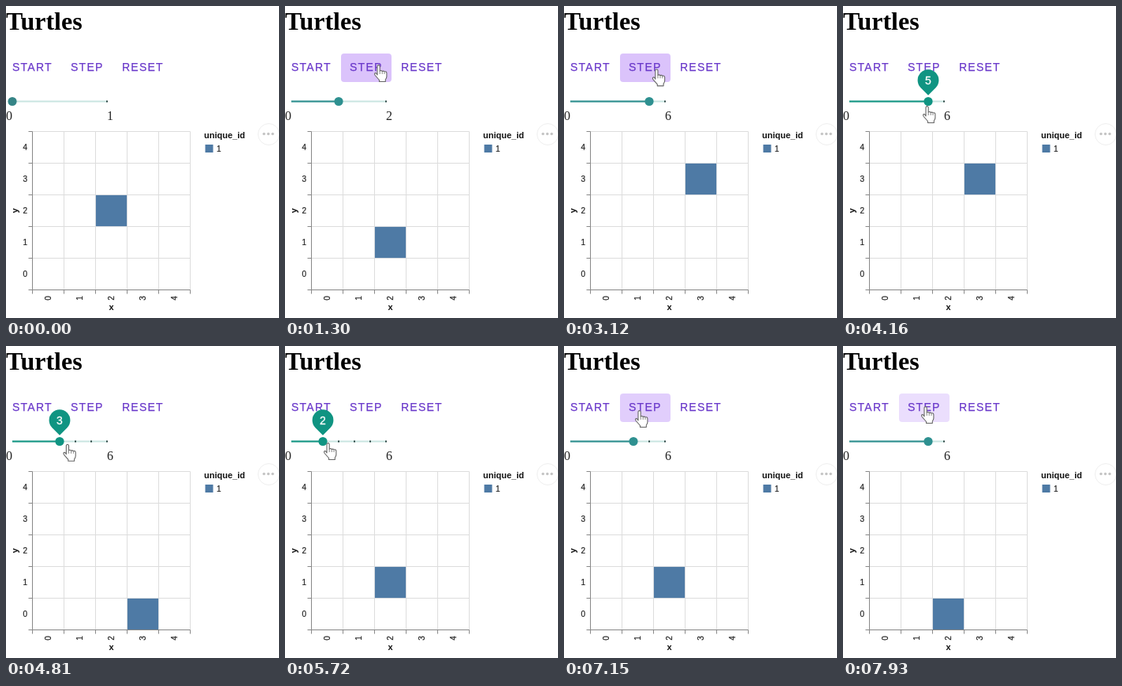
Write an HTML page that moves like this. It is 346x394 px and loops after 8 s.

```html
<!DOCTYPE html>
<html lang="en">
<head>
<meta charset="utf-8">
<title>Turtles</title>
<style>
  html, body { margin: 0; width: 100%; height: 100%; overflow: hidden; background: #fff; }
  svg { display: block; width: 346px; height: 394px; }
  text { font-family: "Liberation Sans", Arial, sans-serif; }
  .serif { font-family: "Liberation Serif", "Times New Roman", serif; font-size: 16px; fill: #222; }
  .button { font-size: 14px; letter-spacing: 1.25px; fill: #6a38ca; stroke: #6a38ca; stroke-width: .25px; }
  .label { font-size: 10px; fill: #222; stroke: #222; stroke-width: .2px; }
  .title { font-size: 11px; font-weight: bold; fill: #111; }
</style>
</head>
<body>
<svg viewBox="0 0 346 394">
  <defs><clipPath id="buttonClip"><rect x="71" y="60" width="64" height="36" rx="4"/></clipPath></defs>

  <text class="serif" y="30.4" style="font-size:32px;font-weight:bold;fill:#000">Turtles</text>

  <g clip-path="url(#buttonClip)" fill="#6200ee">
    <rect id="hover" x="71" y="60" width="64" height="36" opacity="0"/>
    <circle id="ripple" opacity="0"/>
  </g>
  <text class="button" x="8" y="82">START</text>
  <text class="button" x="82" y="82">STEP</text>
  <text class="button" x="147" y="82">RESET</text>

  <rect x="8" y="119.5" width="120" height="2" fill="#c9e5e1"/>
  <g id="marks" fill="#26413f"></g>
  <rect id="fill" x="8" y="119.5" height="2"/>
  <circle id="thumb" cy="120.5" r="5.6"/>
  <text class="serif" x="0" y="144">0</text>
  <text class="serif" id="max" x="128" y="144"></text>

  <g id="grid" fill="none"></g>
  <rect id="turtle" width="40" height="40" fill="#4e7aa5" stroke="#d3d8de"/>
  <g id="axes" fill="none" stroke="#888"></g>
  <g id="labels"></g>
  <text class="title" x="133.5" y="384" text-anchor="middle">x</text>
  <text class="title" transform="translate(15 258.5) rotate(-90)" text-anchor="middle">y</text>

  <text class="title" x="251" y="167">unique_id</text>
  <rect x="252.5" y="175" width="10" height="10" fill="#4e7aa5"/>
  <text class="label" x="267" y="183.5">1</text>

  <circle cx="333" cy="162" r="13.5" fill="#fff" stroke="#efefef"/>
  <g fill="#c4c4c4">
    <circle cx="327" cy="161.5" r="1.7"/><circle cx="332.5" cy="161.5" r="1.7"/><circle cx="338" cy="161.5" r="1.7"/>
  </g>

  <g id="bubble">
    <path d="M0 18.5L-9.5 9A13.4 13.4 0 1 1 9.5 9Z" fill="#109482"/>
    <text id="bubbleText" y="4.5" text-anchor="middle" font-size="14" fill="#fff" stroke="#fff" stroke-width=".3"></text>
  </g>
  <g id="hand" fill="#fff" stroke="#666" stroke-width="1.1" stroke-linejoin="round">
    <path d="M4 13V2.2a1.6 1.6 0 0 1 3.2 0V8q1.6-1.2 3 .4q1.6-.9 2.8 .6q2.6-.8 2.9 1.7V15q0 2-1.6 4V21.5H6.5V19.5L1.2 13.5Q-.2 11.2 1.6 10.6Q3 10.4 4 13Z"/>
    <path d="M7.2 8v4M10.2 8.5V12M13 9.5V12" fill="none" stroke-width=".8"/>
  </g>
</svg>
<script>
const $ = id => document.getElementById(id);
const set = (el, attrs) => { for (const k in attrs) el.setAttribute(k, attrs[k]); };
const add = (parent, tag, attrs, text = '') => {
  const el = document.createElementNS('http://www.w3.org/2000/svg', tag);
  set(el, attrs);
  el.textContent = text;
  parent.append(el);
  return el;
};

const LOOP = 8000, SLIDE = 160;
const clicks = [1040, 1500, 1950, 2400, 2850, 6350, 6790, 7400];
const drag = [3880, 5860];

// time, step, last step, column, row
const states = [
  [0, 0, 1, 2, 2], [1130, 1, 2, 2, 1], [1590, 2, 3, 2, 1], [2040, 3, 4, 3, 0],
  [2490, 4, 5, 3, 4], [2940, 5, 6, 3, 3],
  [4480, 4, 6, 3, 4], [4790, 3, 6, 3, 0], [5080, 2, 6, 2, 1],
  [6440, 3, 6, 3, 0], [6880, 4, 6, 2, 1], [7490, 5, 6, 2, 0]
];
// time, fingertip x, y
const pointer = [
  [390, 150, 186], [900, 118, 74], [2990, 118, 74], [3650, 106, 126], [4250, 106, 126],
  [5300, 54, 122], [5760, 54, 122], [6250, 95, 81], [7150, 95, 81], [7750, 104, 76]
];

const clamp = v => Math.max(0, Math.min(1, v));
const smooth = v => v * v * (3 - 2 * v);
const easeOut = v => 1 - (1 - v) ** 3;
const lastIndex = (rows, t) => Math.max(0, rows.findLastIndex(row => row[0] <= t));
const thumbX = ([, step, max]) => 8 + 120 * step / max;

for (let i = 0; i < 6; i++) {
  const x = 33.5 + 40 * i, y = 158.5 + 40 * i;
  add($('grid'), 'path', { d: `M${x} 158.5v200M33.5 ${y}h200`, stroke: '#ddd' });
  add($('axes'), 'path', { d: `M${x} 358.5v5M33.5 ${y}h-5` });
}
add($('axes'), 'path', { d: 'M33.5 158.5v200h200' });
for (let i = 0; i < 5; i++) {
  add($('labels'), 'text', { class: 'label', x: 27, y: 342 - 40 * i, 'text-anchor': 'end' }, i);
  add($('labels'), 'text', {
    class: 'label', 'text-anchor': 'middle', transform: `translate(${57 + 40 * i} 369) rotate(-90)`
  }, i);
}
const marks = Array.from({ length: 7 }, () => add($('marks'), 'rect', { y: 119.5, width: 2, height: 2 }));

function pointerAt(t) {
  const i = lastIndex(pointer, t), a = pointer[i], b = pointer[i + 1] || a;
  const p = smooth(clamp((t - a[0]) / (b[0] - a[0] || 1)));
  return [a[1] + (b[1] - a[1]) * p, a[2] + (b[2] - a[2]) * p];
}

function drawSlider(t, dragging) {
  const i = lastIndex(states, t), state = states[i];
  const [time, step, max, column, row] = state;
  let x = thumbX(state);
  if (i && !dragging) {
    const from = thumbX(states[i - 1]);
    x = from + (x - from) * easeOut(clamp((t - time) / SLIDE));
  }
  set($('fill'), { width: x - 8, fill: dragging ? '#109482' : '#2b8d8d' });
  set($('thumb'), { cx: x, fill: dragging ? '#109482' : step ? '#2e9090' : '#358486' });
  marks.forEach((mark, n) => set(mark, {
    x: 7 + 120 * n / max, visibility: n > step && n <= max ? 'visible' : 'hidden'
  }));
  $('max').textContent = max;
  set($('turtle'), { x: 33.5 + 40 * column, y: 318.5 - 40 * row });

  const scale = smooth(clamp(Math.min(t - drag[0], drag[1] - t) / 120));
  set($('bubble'), { transform: `translate(${x} ${113 - 18.8 * scale}) scale(${scale})` });
  $('bubbleText').textContent = step;
}

function drawButton(t, x, y) {
  const over = x > 71 && x < 135 && y > 60 && y < 96 && t >= pointer[0][0];
  set($('hover'), { opacity: over ? 0.13 : 0 });
  const click = clicks.findLast(c => c <= t);
  const age = click === undefined ? 1e4 : t - click;
  const grow = smooth(clamp(age / 225));
  set($('ripple'), {
    cx: x + (103 - x) * grow, cy: y + (78 - y) * grow, r: 12 + 30 * grow,
    opacity: over ? 0.12 * clamp(age / 150) * clamp((450 - age) / 150) : 0
  });
}

function draw(t) {
  const [x, y] = pointerAt(t);
  drawSlider(t, t >= drag[0] && t < drag[1]);
  drawButton(t, x, y);
  set($('hand'), {
    transform: `translate(${x - 5} ${y})`, visibility: t < pointer[0][0] ? 'hidden' : 'visible'
  });
}

const start = performance.now();
function frame() {
  draw((performance.now() - start) % LOOP);
  requestAnimationFrame(frame);
}
frame();
</script>
</body>
</html>
```
